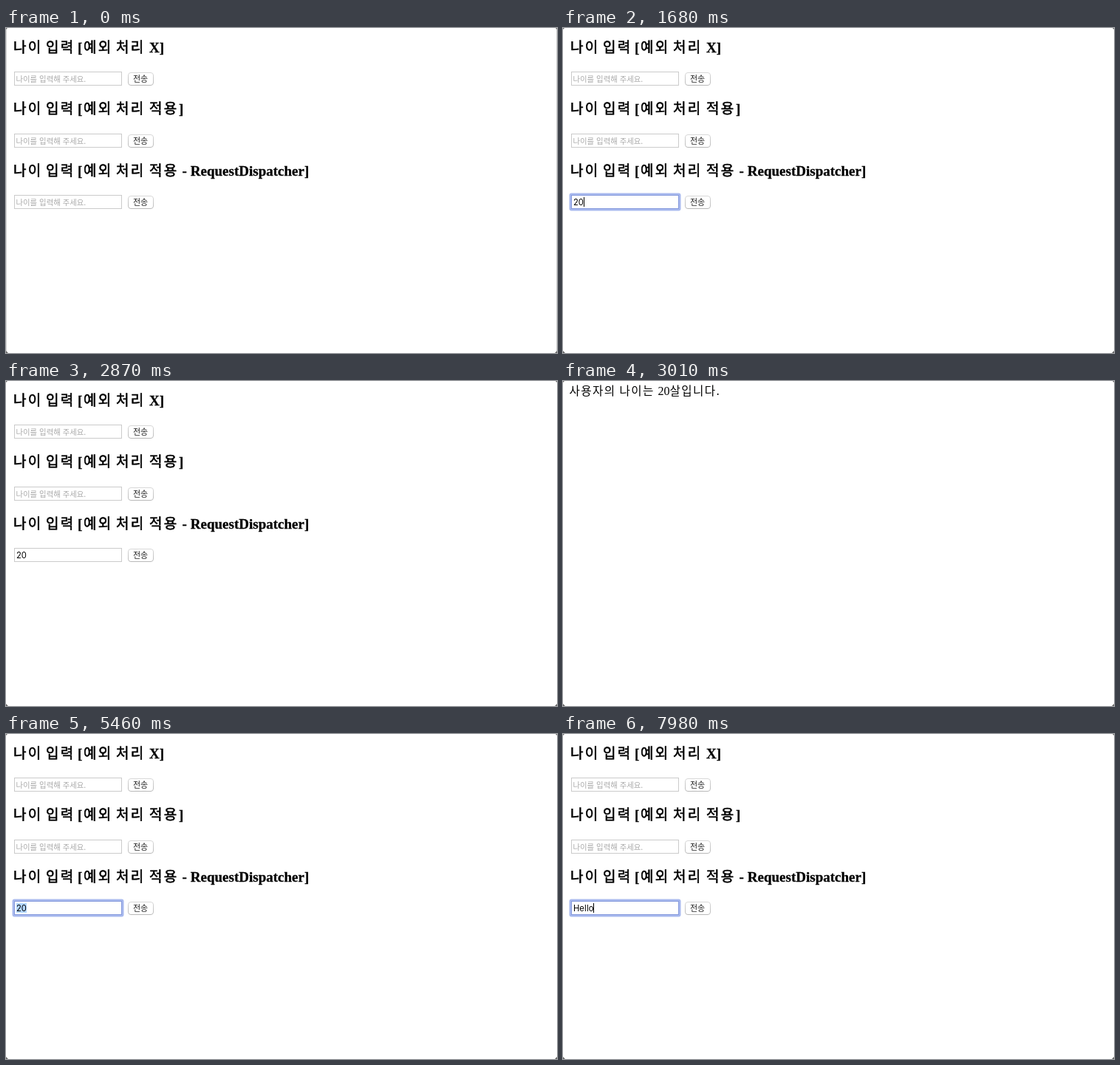
An HTML page that plays this animation: 746 px wide and 440 px high, repeating every 8 s.

```html
<!DOCTYPE html>
<html lang="ko">
<head>
<meta charset="utf-8">
<style>
html, body { margin: 0; width: 100%; height: 100%; overflow: hidden; background: #fff; }
svg { display: block; }
text { white-space: pre; }
.ko { font-family: "Noto Sans CJK KR", "Noto Sans CJK", sans-serif; }
.la { font-family: "Liberation Serif", serif; }
.head { font-weight: 700; font-size: 19px; stroke: #000; stroke-width: .3px; }
.head.ko { font-weight: 400; font-size: 19px; letter-spacing: 2.2px; stroke-width: .6px; }
.body { font-size: 16px; }
.body.ko { font-weight: 300; font-size: 15.6px; letter-spacing: 1.4px; }
.hint { font-size: 10.4px; fill: #a9a9a9; }
.send { font-size: 11px; }
.typed { font: 11.2px Inter, sans-serif; letter-spacing: .15px; }
</style>
</head>
<body>
<svg id="stage" width="746" height="440" viewBox="0 0 746 440">
  <defs>
    <linearGradient id="blue" x2="0" y2="1">
      <stop offset="0" stop-color="#6ca6f6"/><stop offset="1" stop-color="#366be0"/>
    </linearGradient>
    <linearGradient id="edge" x2="0" y2="1">
      <stop offset="0" stop-color="#d8d8d8"/><stop offset="1" stop-color="#b9b9b9"/>
    </linearGradient>
  </defs>
  <g id="form"></g>
  <g id="result"></g>
  <path id="sides" d="M.5 0V440M745.5 0V440" stroke="#d6d6d6"/>
  <path d="M0 0h2l-2 2zM746 0h-2l2 2zM0 440h3l-3-3zM746 440h-3l3-3z" fill="#666"/>
</svg>
<script>
const $ = id => document.getElementById(id);

function add(parent, tag, attrs, content = '') {
  const el = document.createElementNS('http://www.w3.org/2000/svg', tag);
  for (const k in attrs) el.setAttribute(k, attrs[k]);
  el.textContent = content;
  return parent.appendChild(el);
}

// Each word is [x, string]; Hangul and Latin use different faces.
function line(parent, y, style, words) {
  for (const [x, s] of words)
    add(parent, 'text', { x, y, class: style + (/[가-힣]/.test(s) ? ' ko' : ' la') }, s);
}

function field(top) {
  const g = $('form');
  const ring = add(g, 'rect', { x: 8.5, y: top - 2.5, width: 151, height: 24, rx: 3, fill: '#a8b9ee' });
  const box = add(g, 'rect', { x: 11.5, y: top + .5, width: 145, height: 18, fill: '#fff', stroke: '#cbcbcb' });
  const hint = add(g, 'text', { x: 13.5, y: top + 13.8, class: 'ko hint' }, '나이를 입력해 주세요.');
  const mark = add(g, 'rect', { x: 14, y: top + 3, width: 14, height: 13, fill: '#b3d7ff' });
  const typed = add(g, 'text', { x: 13.9, y: top + 14, class: 'typed' });
  const caret = add(g, 'rect', { y: top + 3, width: 1, height: 13 });
  const button = add(g, 'rect', { x: 165.5, y: top + 1.5, width: 34, height: 17, rx: 3.5 });
  const label = add(g, 'text', { x: 172, y: top + 14, class: 'ko send' }, '전송');
  const show = (el, on) => el.style.display = on ? '' : 'none';

  return ({ text = '', focus, caretX, selected, pressed }) => {
    show(ring, focus);
    box.setAttribute('stroke', focus ? '#8499dc' : '#cbcbcb');
    show(hint, !text);
    typed.textContent = text;
    show(caret, caretX);
    caret.setAttribute('x', caretX || 0);
    show(mark, selected);
    button.setAttribute('fill', pressed ? 'url(#blue)' : '#fff');
    button.setAttribute('stroke', pressed ? '#3a70e0' : 'url(#edge)');
    label.setAttribute('fill', pressed ? '#fff' : '#222');
    label.setAttribute('stroke', pressed ? '#fff' : 'none');
    label.setAttribute('stroke-width', .3);
  };
}

const start = [[10, '나이'], [54, '입력'], [97, '['], [105, '예외'], [149, '처리']];
const applied = [...start, [194, '적용']];
line($('form'), 33, 'head', [...start, [194, 'X]']]);
line($('form'), 116, 'head', [...applied, [234, ']']]);
line($('form'), 200, 'head', [...applied, [238.6, '-'], [249.8, 'RequestDispatcher]']]);
line($('result'), 19, 'body', [[8.5, '사용자의'], [76.5, '나이는'], [128.5, '20'], [144.5, '살입니다.']]);

field(59)({});
field(143)({});
const age = field(226);

const typing = (text, caretX) => ({ text, caretX, focus: true });
const steps = [
  [0, {}],
  [980, typing('', 14)],
  [1470, typing('')],
  [1540, typing('2', 21)],
  [1680, typing('20', 28)],
  [2170, typing('20')],
  [2730, { text: '20', pressed: true }],
  [2870, { text: '20' }],
  [3010, { sent: true }],
  [4550, { text: '20' }],
  [5320, typing('20', 28)],
  [5460, { text: '20', focus: true, selected: true }],
  [5880, typing('H', 22)],
  [6370, typing('He', 29)],
  [6580, typing('Hel', 31)],
  [6720, typing('Hell', 34)],
  [6930, typing('Hello', 41)],
  [7490, typing('Hello')],
  [7980, typing('Hello', 41)]
];

function draw(now) {
  const t = now % 8000;
  const state = steps.findLast(s => s[0] <= t)[1];
  age(state);
  $('form').style.display = state.sent ? 'none' : '';
  $('result').style.display = state.sent ? '' : 'none';
  $('sides').style.display = t < 980 ? '' : 'none';
  requestAnimationFrame(draw);
}
draw(performance.now());
</script>
</body>
</html>
```
